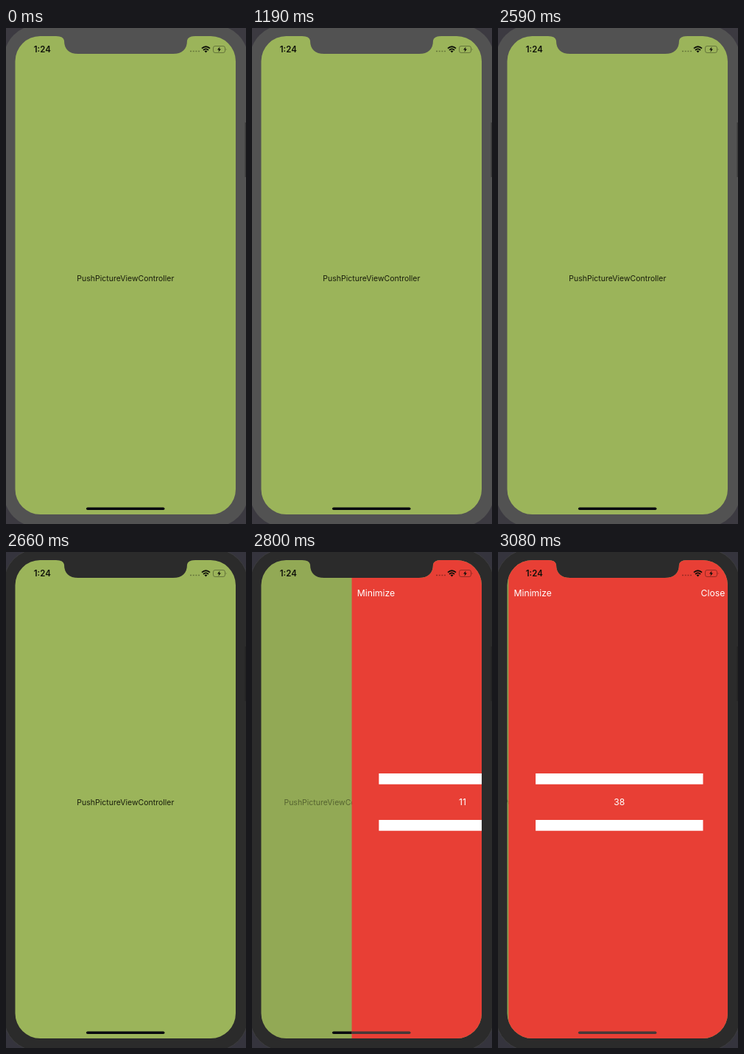
Animation of 326 by 672 pixels, one loop 3150 ms. Source, as an HTML page:

```html
<!DOCTYPE html>
<html lang="en">
<head>
<meta charset="utf-8">
<title>Push transition</title>
<style>
  html, body { margin: 0; width: 100%; height: 100%; overflow: hidden; background: #3c3a41; }
  svg { display: block; width: 326px; height: 672px; font-family: Inter, Roboto, sans-serif; }
  #body { fill: #525252; }
  .active #backdrop { fill: #35343d; }
  .active #body { fill: #2b2b2b; stroke: #3d3d3f; }
  .active #sideKey { fill: #242424; }
</style>
</head>
<body>
<svg id="stage" viewBox="0 0 326 672">
  <defs>
    <clipPath id="screen">
      <path d="M46 11H68Q78 11 79 17C79 29 86 35 98 35H227C239 35 246 29 246 17Q247 11 257 11H278A34 34 0 0 1 312 45V625A34 34 0 0 1 278 659H46.500A34 34 0 0 1 12.500 625V45A34 34 0 0 1 46.500 11Z"/>
    </clipPath>
    <clipPath id="pushed"><rect id="pushedArea" y="0" width="326" height="672"/></clipPath>
    <rect id="homeBar" x="109" y="649.500" width="106.500" height="3.600" rx="1.800"/>
  </defs>

  <rect id="backdrop" width="326" height="672" fill="#3c3a41"/>
  <rect id="body" x="-3" y="-4" width="332" height="680" rx="46"/>
  <rect id="sideKey" x="324.500" y="128" width="2" height="74" fill="#3a3a3a"/>

  <g clip-path="url(#screen)">
    <rect width="326" height="672" fill="#9bb45a"/>
    <text id="label" x="162.400" y="342.500" font-size="10.500" text-anchor="middle" fill="#191d0c">PushPictureViewController</text>
    <rect id="dim" width="326" height="672" opacity="0"/>
    <use href="#homeBar" fill="#08080f"/>

    <g id="page" fill="#fff" font-size="12.200">
      <rect width="326" height="672" fill="#e83f35"/>
      <text x="7.200" y="59.800">Minimize</text>
      <text x="294" y="59.800" text-anchor="end">Close</text>
      <rect x="36.800" y="300" width="227.400" height="14.700"/>
      <rect x="36.800" y="363" width="227.400" height="14.700"/>
      <text id="count" x="150.500" y="343" text-anchor="middle"></text>
    </g>
    <use href="#homeBar" fill="#463838" clip-path="url(#pushed)"/>

    <g id="status" fill="#0d0f08">
      <text x="37.800" y="33" font-size="11.400" font-weight="600">1:24</text>
      <path d="M250 31.500h13" fill="none" stroke="#000" stroke-opacity=".35" stroke-width="1.500" stroke-dasharray="2 1.700"/>
      <g fill="none" stroke="#0d0f08" stroke-width="1.800">
        <path d="M266 27.700Q271.500 22.800 277 27.700M268 30Q271.500 26.700 275 30"/>
      </g>
      <path d="M269.500 31.300Q271.500 29.700 273.500 31.300L271.500 33.500Z"/>
      <rect x="281.500" y="24.500" width="16" height="9" rx="2.500" fill="none" stroke="#000" stroke-opacity=".38" stroke-width=".9"/>
      <path d="M298.700 27.500Q300.500 29 298.700 30.500Z" opacity=".4"/>
      <path d="M290.500 25.500L287 29.600H289.200L288.500 32.700L292 28.500H289.800Z"/>
    </g>
  </g>
</svg>
<script>
  const LOOP = 3150, STEP = 70;
  const FOCUS_AT = 2660, PUSH_AT = 2694, COUNT_AT = 2685;
  const LEFT = 12.5, WIDTH = 299.5, OMEGA = 0.0187;
  const el = id => document.getElementById(id);
  const shift = (id, x) => el(id).setAttribute('transform', `translate(${x} 0)`);

  // Critically damped spring from 0 to 1.
  function spring(ms) {
    const x = OMEGA * Math.max(0, ms);
    return 1 - (1 + x) * Math.exp(-x);
  }

  function draw(now) {
    const t = Math.floor((now % LOOP) / STEP) * STEP;
    const p = spring(t - PUSH_AT);
    const edge = LEFT + WIDTH * (1 - p);

    el('stage').classList.toggle('active', t >= FOCUS_AT);
    shift('page', edge);
    el('pushedArea').setAttribute('x', edge);
    shift('label', -0.3 * WIDTH * p);
    el('label').setAttribute('opacity', p ? 0.2 + 0.5 * p : 1);
    el('dim').setAttribute('opacity', 0.1 * p);
    el('count').textContent = Math.max(0, Math.floor((t - COUNT_AT) * 0.097));
    requestAnimationFrame(() => draw(performance.now()));
  }
  draw(performance.now());
</script>
</body>
</html>
```
